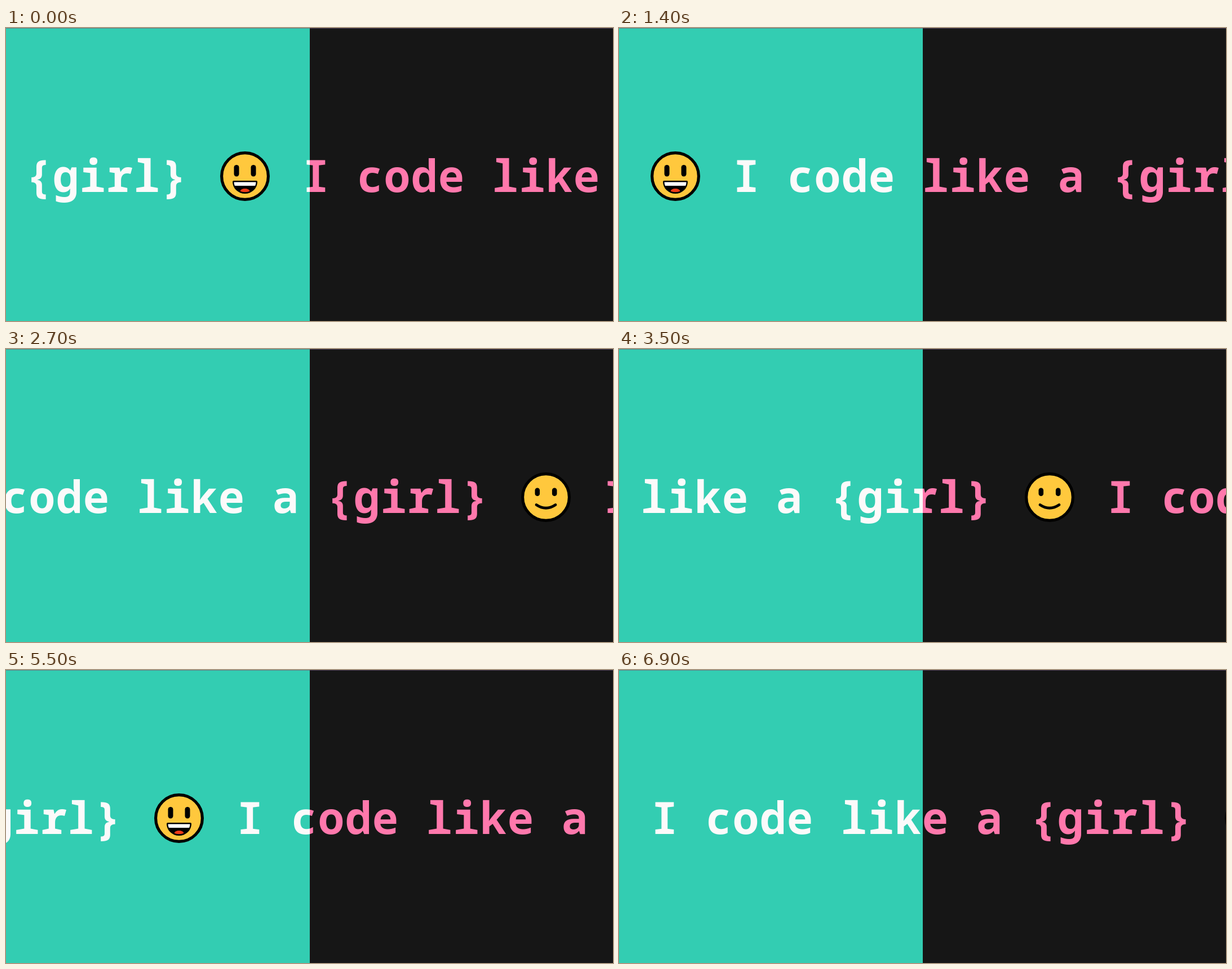
Write an HTML page that moves like this. It is 1077 by 520 pixels and loops after 7 s.

```html
<!DOCTYPE html>
<html lang="en">
<head>
<meta charset="utf-8">
<title>I code like a {girl}</title>
<style>
  html, body { margin: 0; width: 100%; height: 100%; overflow: hidden; background: #161616; }
  svg { display: block; width: 100%; height: 100%; }
  text { font: 700 78px "Noto Sans Mono", "DejaVu Sans Mono", monospace; letter-spacing: 1.2px; white-space: pre; }
  .light { fill: #fcfafa; }
  .pink { fill: #ff78ac; }

  /* Ten position updates a second, with two short stalls */
  .strip { animation: slide 7s -1ms infinite; }
  @keyframes slide {
    0%       { transform: translateX(424px);    animation-timing-function: steps(14); }
    20%      { transform: translateX(100px);    animation-timing-function: steps(10); }
    34.2857% { transform: translateX(-160px);   animation-timing-function: steps(1); }
    35.7142% { transform: translateX(-183px);   animation-timing-function: steps(1); }
    38.5714% { transform: translateX(-206px);   animation-timing-function: steps(8); }
    50%      { transform: translateX(-400px);   animation-timing-function: steps(8); }
    61.4285% { transform: translateX(-590.5px); animation-timing-function: steps(3); }
    65.7142% { transform: translateX(-662.5px); animation-timing-function: steps(1); }
    68.5714% { transform: translateX(-687px);   animation-timing-function: steps(7); }
    78.5714% { transform: translateX(-857px);   animation-timing-function: steps(14); }
    98.5714%, 100% { transform: translateX(-1209px); }
  }
</style>
</head>
<body>
<svg viewBox="0 0 1077 520" preserveAspectRatio="none">
  <defs>
    <clipPath id="leftHalf"><rect width="539" height="520"/></clipPath>
    <clipPath id="rightHalf"><rect x="539" width="538" height="520"/></clipPath>
    <clipPath id="mouth"><path d="M-19.5 10.5H19.5A19.5 17.8 0 0 1 -19.5 10.5Z"/></clipPath>

    <circle id="head" r="41.4" fill="#ffc83d" stroke="#000" stroke-width="5.2"/>

    <g id="grin">
      <use href="#head"/>
      <rect x="-19.5" y="-20" width="9" height="20.5" rx="4.5" fill="#000"/>
      <rect x="10.5" y="-20" width="9" height="20.5" rx="4.5" fill="#000"/>
      <path d="M-20 8H20Q22 8 22 10A22 21 0 0 1 -22 10Q-22 8 -20 8Z" fill="#000"/>
      <g clip-path="url(#mouth)">
        <rect x="-20" y="10" width="40" height="7" fill="#fff"/>
        <ellipse cy="27" rx="8.5" ry="5" fill="#f03a17"/>
      </g>
    </g>

    <g id="smile">
      <use href="#head"/>
      <rect x="-19.5" y="-16.5" width="8.6" height="14.5" rx="4.3" fill="#000"/>
      <rect x="10.9" y="-16.5" width="8.6" height="14.5" rx="4.3" fill="#000"/>
      <path d="M-17 13.5Q0 25 17 13.5" fill="none" stroke="#000" stroke-width="4.8" stroke-linecap="round"/>
    </g>

    <text id="words" x="102.6" y="291">I code like a {girl}</text>
    <g id="grinUnit"><use href="#grin" y="263"/><use href="#words"/></g>
    <g id="smileUnit"><use href="#smile" y="263"/><use href="#words"/></g>
  </defs>

  <rect width="1077" height="520" fill="#161616"/>
  <rect width="539" height="520" fill="#33cdb2"/>
  <rect width="539" height="1" fill="#607f88"/>
  <rect x="539" width="538" height="1" fill="#4b3c54"/>

  <g clip-path="url(#leftHalf)">
    <g class="strip light">
      <use href="#grinUnit" x="-1164"/>
      <use href="#grinUnit"/>
      <use href="#grinUnit" x="1164"/>
      <use href="#grinUnit" x="2328"/>
    </g>
  </g>
  <g clip-path="url(#rightHalf)">
    <g class="strip pink">
      <use href="#smileUnit" x="-1164"/>
      <use href="#smileUnit"/>
      <use href="#smileUnit" x="1164"/>
      <use href="#smileUnit" x="2328"/>
    </g>
  </g>
</svg>
</body>
</html>
```
